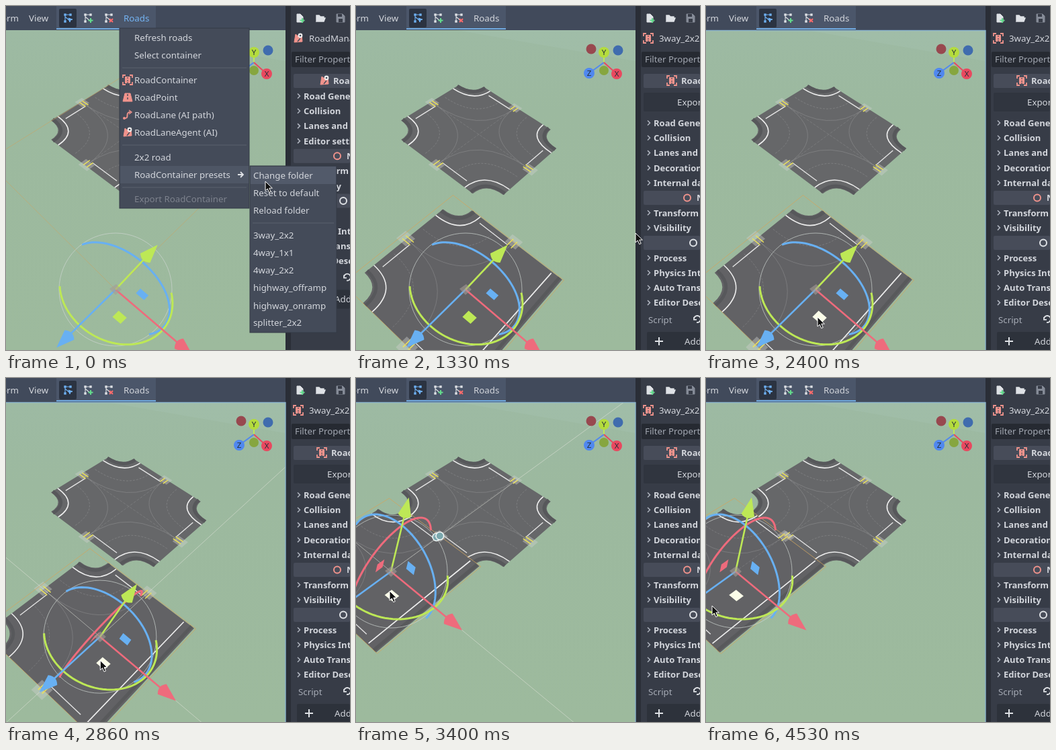
Recreate the animation shown at these times as an HTML page with a canvas. Size 512 by 512 pixels, loop 4.93 s.

```html
<!DOCTYPE html>
<html lang="en">
<head>
<meta charset="utf-8">
<title>Snapping a road junction</title>
<style>
html, body { margin: 0; width: 100%; height: 100%; overflow: hidden; background: #9cb99e; }
canvas, svg { position: absolute; left: 0; top: 0; width: 100vw; height: 100vh; display: block; }
text { font: 13.3px "Noto Sans", "Open Sans", sans-serif; fill: #d3d6dc; white-space: pre; }
.bold { font-size: 13px; font-weight: 700; }
.dim { fill: #7d828d; }
</style>
</head>
<body>
<canvas id="scene"></canvas>
<svg id="ui" viewBox="0 0 512 512"></svg>
<script>
const LOOP = 4930, TICK = 1000 / 15;
const RED = '#ee6b7c', GREEN = '#bde856', BLUE = '#68b0f2', PINK = '#f0938c';
const canvas = document.getElementById('scene'), ctx = canvas.getContext('2d');
const ui = document.getElementById('ui');

// Keys: [tick, x, y]
const cursorKeys = [[0, 386, 261], [1, 386, 264], [8, 388, 326], [10, 390, 337], [17, 390, 337], [20, 416, 338],
  [23, 416, 338], [31, 174, 471], [36, 166, 463], [40, 166, 463], [47, 106, 364], [51, 50, 317],
  [54, 41, 320], [58, 15, 334], [60, 8, 339], [66, 8, 339], [68, 9, 339]];
const originKeys = [[0, 163, 422], [40, 163, 422], [47, 109, 336], [51, 52, 288], [54, 44, 288],
  [58, 21, 299], [60, 16, 303], [61, 44, 288]];
const PLACED = 17, FOCUS = 25, HOVER = 31, DRAG = 41, DROP = 61;

function sample(keys, tick) {
  const i = keys.findIndex(k => k[0] > tick);
  if (i < 0) return keys[keys.length - 1].slice(1);
  const [t0, x0, y0] = keys[i - 1], [t1, x1, y1] = keys[i], p = (tick - t0) / (t1 - t0);
  return [x0 + (x1 - x0) * p, y0 + (y1 - y0) * p];
}

// Ground plane seen in perspective; the fixed junction sits at (0, 0).
const H = { a: 63.7, b: -71.5, c: 182.7, d: 40.3, e: 28.5, f: 191.1, g: -.05, h: -.072 };
function project(u, v) {
  const w = 1 + H.g * u + H.h * v;
  return [(H.a * u + H.b * v + H.c) / w, (H.d * u + H.e * v + H.f) / w];
}
const tangentU = (x, y) => [H.a - x * H.g, H.d - y * H.g];
const tangentV = (x, y) => [H.b - x * H.h, H.e - y * H.h];
function ground(x, y) {
  const [p, r] = tangentU(x, y), [q, s] = tangentV(x, y), m = x - H.c, n = y - H.f, det = p * s - q * r;
  return [(m * s - q * n) / det, (p * n - m * r) / det];
}

function stroke(color, width, dash = []) {
  ctx.strokeStyle = color; ctx.lineWidth = width; ctx.setLineDash(dash); ctx.stroke();
}
function trace(points, close) {
  ctx.beginPath();
  points.forEach(p => ctx.lineTo(...p));
  if (close) ctx.closePath();
}
function fill(points, color) { trace(points, true); ctx.fillStyle = color; ctx.fill(); }
function line(points, color, width, dash) { trace(points); stroke(color, width, dash); }
function dot(x, y, r, color) { ctx.beginPath(); ctx.arc(x, y, r, 0, 7); ctx.fillStyle = color; ctx.fill(); }

function spin(u, v, turns) {
  for (let i = 0; i < turns; i++) [u, v] = [-v, u];
  return [u, v];
}

function road(u0, v0, threeWay) {
  const arms = threeWay ? [0, 1, 3] : [0, 1, 2, 3], corners = threeWay ? [0, 3] : arms;
  const at = (u, v, r = 0) => { const [x, y] = spin(u, v, r); return project(u0 + x, v0 + y); };
  const END = threeWay ? .99 : 1.02, W = .71, L = .56, SIDE = threeWay ? .76 : W;
  const bend = (r, from, mid) => ctx.quadraticCurveTo(...at(-mid, -mid, r), ...at(-from, -END, r));

  ctx.beginPath();
  for (const r of arms) {
    ctx.lineTo(...at(-END, r === 3 ? SIDE : W, r));
    ctx.lineTo(...at(-END, r === 1 ? -SIDE : -W, r));
    if (corners.includes(r)) bend(r, W, W);
  }
  ctx.closePath();
  ctx.fillStyle = threeWay ? '#626265' : '#666769';
  ctx.fill();

  for (const r of corners) {
    ctx.beginPath();
    ctx.moveTo(...at(-END, -.67, r));
    bend(r, .67, .67);
    stroke('#57585b', 5);
    ctx.beginPath();
    ctx.moveTo(...at(-END, -L, r));
    bend(r, L, L);
    stroke('#eeeeee', 1.6);
  }
  if (threeWay) {
    line([at(.72, -END), at(.72, END)], '#58595b', 5);
    line([at(.61, -.97), at(.61, .97)], '#eeeeee', 1.7);
  }
  for (const r of corners) {
    for (const s of [0, .27]) {
      ctx.beginPath();
      ctx.moveTo(...at(-.95, -s, r));
      ctx.quadraticCurveTo(...at(-s, -s, r), ...at(-s, -.95, r));
      stroke('rgba(215,215,215,.25)', .8, s ? [3, 2] : []);
    }
  }
  line([at(0, -.9), at(0, .9)], 'rgba(215,215,215,.2)', .8, [4, 2]);
  if (!threeWay) line([at(-.9, 0), at(.9, 0)], 'rgba(215,215,215,.2)', .8, [4, 2]);

  for (const r of arms) {
    line([at(-.9, .04, r), at(-.9, .5, r)], '#e4e4e4', 1.4);
    const k = .085;
    fill([at(-1 - k, -k, r), at(-1 + k, -k, r), at(-1 + k, k, r), at(-1 - k, k, r)], 'rgba(205,208,205,.42)');
    for (const s of [-.032, .032]) line([at(-1.03, s, r), at(-.89, s, r)], '#ece35a', 1.5);
  }
}

function selectionBox(u, v) {
  const corners = [[-1.06, -1], [.78, -1], [.78, .99], [-1.06, .99]];
  trace(corners.map(([a, b]) => project(u + a, v + b)), true);
  stroke('rgba(211,165,92,.75)', 1);
}

function gizmo(x, y, hovered) {
  const scale = (vec, k) => vec.map(c => c * k / 152);
  const X = scale(tangentU(x, y), 1.6), Z = scale(tangentV(x, y), 1.47), Y = scale([x + 30, y - 627], .325 * 1);
  const mix = (A, B, p, q) => [x + A[0] * p + B[0] * q, y + A[1] * p + B[1] * q];
  const edgeOn = (A, B) => Math.abs(A[0] * B[1] - A[1] * B[0]) < .08;
  const facing = { x: .324, y: .88, z: .324 };

  ctx.beginPath(); ctx.arc(x, y, 84, 0, 7); stroke('rgba(205,212,208,.7)', 1);
  // Only the half facing the camera shows, swelling slightly towards it.
  const ring = (A, B, na, nb, color) => {
    if (edgeOn(A, B)) return;
    const mid = Math.atan2(nb, na), pts = [];
    for (let i = -24; i <= 24; i++) {
      const turn = i * Math.PI / 48, r = 88 * (1 + .08 * Math.cos(turn));
      pts.push(mix(A, B, r * Math.cos(mid + turn), r * Math.sin(mid + turn)));
    }
    line(pts, color, 3);
  };
  ring(Y, Z, facing.y, facing.z, RED);
  ring(X, Y, facing.x, facing.y, BLUE);
  ring(X, Z, facing.x, facing.z, GREEN);

  const plane = (A, B, color) => {
    if (!edgeOn(A, B)) fill([mix(A, B, 26, 26), mix(A, B, 42, 26), mix(A, B, 42, 42), mix(A, B, 26, 42)], color);
  };
  plane(Y, Z, RED);
  plane(X, Y, BLUE);
  plane(X, Z, hovered ? '#fbfde9' : GREEN);

  const arrow = (A, color) => {
    const len = Math.hypot(...A), n = [-A[1] / len, A[0] / len], back = 152 - 27 / len;
    line([[x, y], mix(A, n, back, 0)], color, 2.6);
    ctx.beginPath();
    ctx.moveTo(...mix(A, n, 152, 0));
    ctx.lineTo(...mix(A, n, back, 10));
    ctx.quadraticCurveTo(...mix(A, n, back - 9 / len, 0), ...mix(A, n, back, -10));
    ctx.fillStyle = color;
    ctx.fill();
  };
  arrow(Z, BLUE); arrow(X, RED); arrow(Y, GREEN);
  fill([[x - 9, y - 1], [x + 1, y - 8], [x + 9, y], [x, y + 8]], 'rgba(165,155,150,.6)');
}

function snapLink(u, v) {
  if (Math.hypot(u, v - 2) > 1) return;
  const a = project(0, 1), b = project(u, v - 1);
  line([a, b], '#f4f8f8', 6);
  line([a, b], '#8fb3b8', 2);
  for (const p of [a, b]) { dot(...p, 6.5, '#f4f8f8'); dot(...p, 5, '#7aa7ad'); }
}

function drawScene(tick) {
  const ratio = canvas.width / 512;
  ctx.setTransform(ratio, 0, 0, ratio, 0, 0);
  const sky = ctx.createLinearGradient(0, 36, 0, 512);
  sky.addColorStop(0, '#9dbaa3'); sky.addColorStop(.25, '#9cb99f'); sky.addColorStop(1, '#9dba9d');
  ctx.fillStyle = sky;
  ctx.fillRect(0, 0, 512, 512);
  fill([[150, 36], [416, 36], [416, 82]], 'rgba(165,196,180,.3)');

  const [x, y] = sample(originKeys, tick), [u, v] = ground(x, y);
  road(0, 0, false);
  if (tick < PLACED) {
    const amber = 'rgba(200,164,100,.6)';
    line([[0, 213], [170, 107]], amber, 1);
    line([[0, 260], [163, 422], [290, 298]], amber, 1);
  } else {
    road(u, v, true);
    selectionBox(u, v);
  }
  if (tick >= DRAG && tick < DROP) {
    const axis = 'rgba(225,228,218,.6)';
    line([project(-20, v), project(6, v)], axis, .9);
    line([project(u, -30), project(u, 6)], axis, .9);
    snapLink(u, v);
  }
  gizmo(x, y, tick >= HOVER);

  line([[369, 69], [369, 84]], GREEN, 2);
  line([[347, 100], [369, 84]], '#5088ef', 2);
  line([[388, 101], [369, 84]], '#e9485f', 2);
  dot(350, 64, 7.5, '#98484f'); dot(390, 66, 7.5, '#406cae'); dot(369, 96, 7, '#86a63f');
  dot(369, 69, 8, '#b4dc3d'); dot(347, 100, 8, '#5088ef'); dot(388, 101, 8, '#e9485f');
}

// Interface
const text = (x, y, str, cls = '', extra = '') => `<text x="${x}" y="${y + 4.8}" class="${cls}" ${extra}>${str}</text>`;
const box = (x, y, w, h, color, extra = '') => `<rect x="${x}" y="${y}" width="${w}" height="${h}" fill="${color}" ${extra}/>`;
const path = (d, color, width = 1.6, shape = 'none') =>
  `<path d="${d}" fill="${shape}" stroke="${color}" stroke-width="${width}"/>`;
const ringIcon = (x, y, color) => `<circle cx="${x}" cy="${y}" r="5" fill="none" stroke="${color}" stroke-width="2"/>`;

function containerIcon(x, y) {
  return path(`M${x - 7} ${y - 3}v-4h4m6 0h4v4m0 6v4h-4m-6 0h-4v-4`, PINK, 1.8) +
    box(x - 4, y - 5, 8, 10, PINK) + path(`M${x} ${y - 4}v2m0 2v2m0 1v2`, '#444b59', 1.2);
}
function pointIcon(x, y) {
  return path(`M${x - 4} ${y - 6}h8l3 12h-14z`, PINK, 1, PINK) + path(`M${x} ${y - 5}v3m0 2v3`, '#444b59', 1.4);
}
function laneIcon(x, y) {
  return path(`M${x - 5} ${y + 5}c9 1 0 -9 9 -9`, PINK, 2) +
    `<circle cx="${x - 5}" cy="${y + 5}" r="2" fill="${PINK}"/>` + path(`M${x + 2} ${y - 7}l4 3l-4 3`, PINK, 1.4);
}
function agentIcon(x, y) {
  return path(`M${x - 6} ${y + 6}l2 -12l4 3l5 -3l1 11z`, PINK, 1, PINK) +
    path(`M${x - 1} ${y + 5}l4 -5`, '#444b59', 1.4) + `<circle cx="${x + 3}" cy="${y - 4}" r="3.4" fill="#eee"/>` +
    `<circle cx="${x + 3}" cy="${y - 4}" r="1.3" fill="#444b59"/>`;
}

function nodeIcon(x, color, mark) {
  return path(`M${x - 4} 23v-10l8 0M${x - 4} 16l7 6`, color, 1.1) +
    [[-4, 13], [-4, 23], [4, 13]].map(([dx, y]) => box(x + dx - 1.7, y - 1.7, 3.4, 3.4, color)).join('') + mark;
}
function toolbar() {
  return box(0, 0, 417, 36, '#414a5b') + box(75, 0, 148, 33, '#4b566a') + box(75, 33, 148, 2, '#70a9df') +
    box(79, 4, 26, 28, '#2b3341', 'rx="2"') + text(-7, 18, 'orm') + text(34, 18, 'View') +
    nodeIcon(92, '#6fb1f3', path('M93 18l6 2l-3 1l-1 3z', '#6fb1f3', 1, '#6fb1f3')) +
    nodeIcon(122, '#dfe2e6', path('M126 18v7m-3.5 -3.5h7', '#63dc8c', 2)) +
    nodeIcon(153, '#dfe2e6', path('M154 19l5 5m0 -5l-5 5', '#ff6b6b', 2));
}

function inspector(title, icon, start, rows) {
  let out = icon(435, 48) + text(451, 48, title) + box(428, 101, 84, 21, '#474c59', 'rx="2"') +
    icon(title[0] === '3' ? 470 : 474, 111) + text(title[0] === '3' ? 484 : 487, 111, 'Road', 'bold');
  let y = start;
  for (const row of rows) {
    if (row[0] === '#') {
      out += box(428, y - 10.5, 84, 21, '#474c59', 'rx="2"') +
        (row === '#N' ? ringIcon(493, y, PINK) + text(507, y, 'Node3D', 'bold') : ringIcon(502, y, '#dfe2e6'));
    } else {
      out += path(`M434 ${y - 3.5}l3.5 3.5l-3.5 3.5`, '#aeb3bd', 1.5) + text(443, y, row, 'bold');
    }
    y += 22.3;
  }
  y += 3;
  return out + text(435, y, 'Script', '', 'style="fill:#a6abb5"') +
    path(`M503 ${y - 4}v4h4m-4 0a5 5 0 1 1 4 4`, '#dfe2e6', 1.8) +
    box(433, y + 18, 79, 28, '#2d323b', 'rx="2"') + path(`M445 ${y + 32}h12m-6 -6v12`, '#dfe2e6', 2) +
    text(489, y + 32, 'Add Metadata');
}
const nodeRows = ['#N', 'Transform', 'Visibility', '#o', 'Process', 'Physics Interpolation', 'Auto Translate', 'Editor Description'];

function panel() {
  return box(416, 0, 96, 512, '#2a2e37') + box(424, 0, 88, 512, '#373c47') +
    path('M433 12h5l4 4v8h-9z', '#dfe2e6', 1, '#dfe2e6') + path('M441 18v7m-3.5 -3.5h7', '#63dc8c', 2) +
    path('M462 23v-9h4l2 2h5v2M462 23l3 -5h10l-2 5z', '#dfe2e6', 1.4, '#dfe2e6') +
    path('M492 12h9l3 3v9h-12z', '#858b97', 1, '#858b97') + box(494, 12, 6, 4, '#373c47') + box(495, 19, 6, 5, '#373c47') +
    box(425, 68, 87, 23, '#262a32', 'rx="2"') + text(430, 79, 'Filter Properties', '', 'style="fill:#a3a8b2"');
}

const presetRows = [[252, 'Change folder'], [278, 'Reset to default'], [304, 'Reload folder'], [341, '3way_2x2'], [367, '4way_1x1'],
  [393, '4way_2x2'], [419, 'highway_offramp'], [446, 'highway_onramp'], [471, 'splitter_2x2']];
function menus() {
  const rule = (x, y, w) => box(x, y, w, 1, '#5b626f');
  const frame = 'stroke="#353b47"';
  return box(169, 33, 193, 268, '#444b59', frame) + box(170, 238, 191, 26, '#4e5665') +
    text(191, 47, 'Refresh roads') + text(191, 73, 'Select container') + rule(173, 91.5, 185) +
    containerIcon(181, 110) + text(191, 110, 'RoadContainer') + pointIcon(181, 136) + text(191, 136, 'RoadPoint') +
    laneIcon(181, 162) + text(191, 162, 'RoadLane (AI path)') + agentIcon(181, 188) + text(191, 188, 'RoadLaneAgent (AI)') +
    rule(173, 206.5, 185) + text(191, 225, '2x2 road') + text(191, 251, 'RoadContainer presets') +
    path('M345 251h8m-4 -4l4 4l-4 4', '#dfe2e6', 1.8) + rule(173, 269.5, 185) + text(191, 287, 'Export RoadContainer', 'dim') +
    box(363, 238, 129, 248, '#444b59', frame) + '<rect id="hover" x="364" width="127" height="26" fill="#525a6a"/>' +
    rule(367, 322.5, 121) + presetRows.map(([y, name]) => text(368, y, name)).join('');
}

ui.innerHTML = toolbar() + panel() +
  `<g id="managed">${inspector('RoadManager', agentIcon, 134, ['Road Generation', 'Collision', 'Lanes and AI', 'Editor settings', ...nodeRows])}</g>` +
  `<g id="placed">${box(428, 129, 84, 28, '#30353f', 'rx="2"') + text(478, 143, 'Export') +
    inspector('3way_2x2', containerIcon, 174, ['Road Generation', 'Collision', 'Lanes and AI', 'Decoration', 'Internal data', ...nodeRows])}</g>` +
  text(175, 18, 'Roads', '', 'id="roads"') +
  [['Y', 369, 69], ['Z', 347, 100], ['X', 388, 101]].map(([s, x, y]) =>
    text(x, y - .5, s, '', 'text-anchor="middle" style="font-size:11.5px;fill:#25303a"')).join('') +
  box(-4, 36.5, 420, 480, 'none', 'id="focus" stroke="#8ab4cc" stroke-width="1.4"') + `<g id="menus">${menus()}</g>` +
  '<path id="cursor" d="M0 0v14l3.3-3l2.4 5.6l2.5-1.1l-2.4-5.4h4.6z" fill="#111" stroke="#fff" stroke-width="1"/>';

const part = id => document.getElementById(id);
const show = (id, on) => { part(id).style.display = on ? '' : 'none'; };

function render(tick) {
  drawScene(tick);
  const [x, y] = sample(cursorKeys, tick), open = tick < PLACED;
  show('menus', open); show('managed', open); show('placed', !open); show('focus', tick >= FOCUS);
  part('roads').style.fill = open ? '#74b4f4' : '#d3d6dc';
  part('cursor').setAttribute('transform', `translate(${x} ${y})`);
  const row = presetRows.find(r => Math.abs(r[0] - y) <= 13);
  show('hover', row);
  if (row) part('hover').setAttribute('y', row[0] - 13);
}

canvas.width = canvas.height = 512 * Math.max(1, devicePixelRatio || 1);
let last = -1;
function play() {
  const tick = Math.floor((performance.now() % LOOP + 7) / TICK);
  if (tick !== last) render(last = tick);
  requestAnimationFrame(play);
}
play();
</script>
</body>
</html>
```
